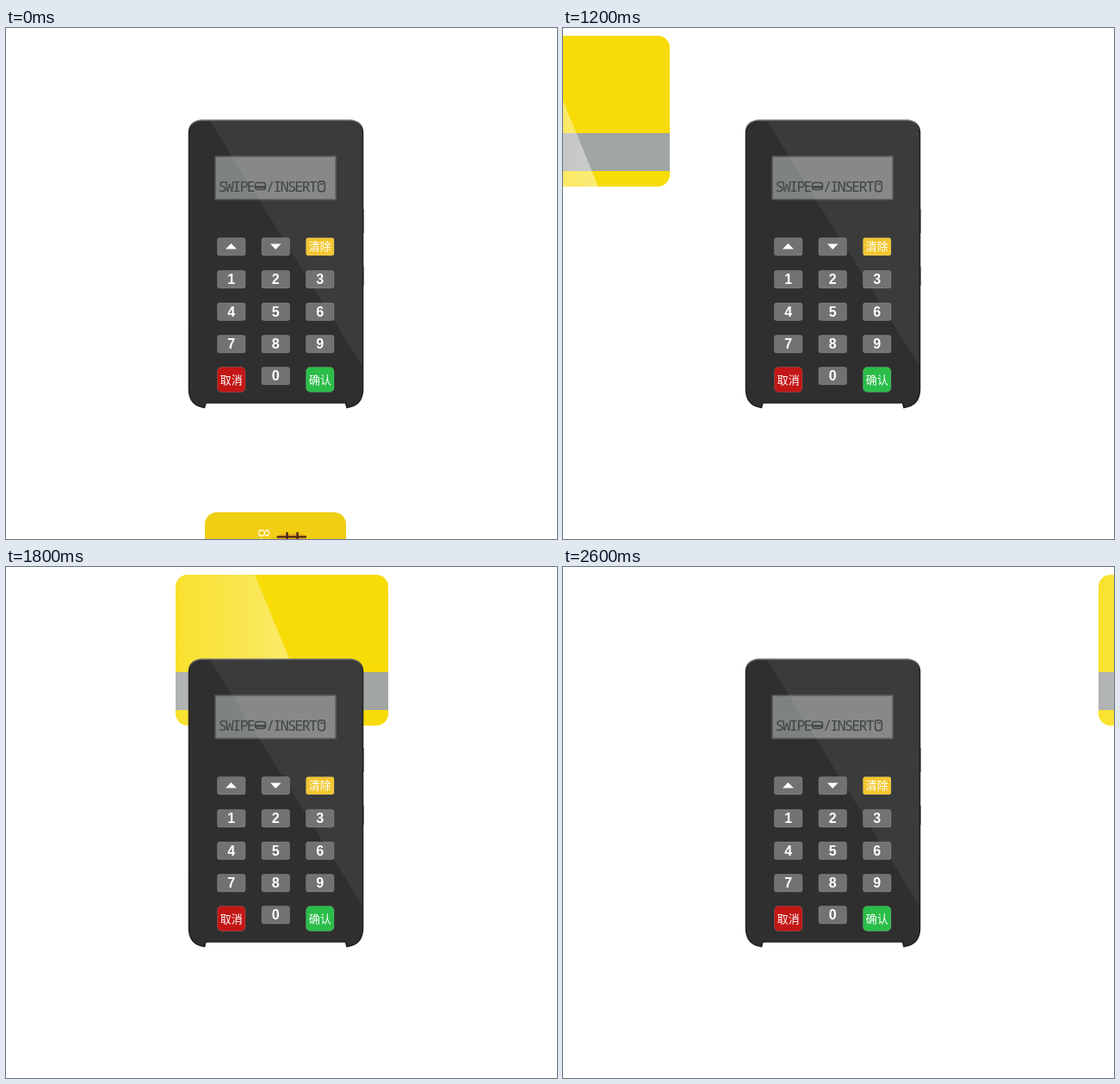
Animation, 640 px wide and 593 px high, one loop 2800 ms. Source, as an HTML page:

```html
<!DOCTYPE html>
<html lang="zh">
<head>
<meta charset="utf-8">
<title>Card terminal</title>
<style>
  html, body { margin: 0; width: 100%; height: 100%; overflow: hidden; background: #fff; }
  svg { display: block; }
  .digit { font: bold 16px "Liberation Sans", Arial, sans-serif; }
  .label { font: 500 13px "Noto Sans CJK SC", "Noto Sans CJK", sans-serif; }
  .digit, .label { fill: #fff; text-anchor: middle; }
  .lcd { font: 500 17px "Noto Sans Mono", monospace; letter-spacing: -1.9px; fill: #414543; }
  .number { font: 18px "Liberation Sans", Arial, sans-serif; letter-spacing: .4px; word-spacing: 7px; fill: #fffbe8; }
</style>
</head>
<body>
<svg width="640" height="593" viewBox="0 0 640 593">
  <defs>
    <linearGradient id="frontShine" x1="1" y1="0" x2=".3" y2="1">
      <stop offset="0" stop-color="#fbec9e"/>
      <stop offset="1" stop-color="#fbe056"/>
    </linearGradient>
    <linearGradient id="backShine">
      <stop offset="0" stop-color="#fff" stop-opacity=".15"/>
      <stop offset="1" stop-color="#fff" stop-opacity=".45"/>
    </linearGradient>
    <linearGradient id="edge" x2="0" y2="1">
      <stop offset="0" stop-color="#777"/>
      <stop offset=".03" stop-color="#262626"/>
      <stop offset="1" stop-color="#202020"/>
    </linearGradient>
    <clipPath id="frontShape"><rect width="164" height="231" rx="14"/></clipPath>
    <clipPath id="backShape"><rect width="247" height="175" rx="14"/></clipPath>
  </defs>

  <g id="front"><g clip-path="url(#frontShape)">
    <rect width="164" height="231" fill="#f0ce14"/>
    <path d="M164 66L0 171V231H164Z" fill="url(#frontShine)"/>
    <rect x="84" y="25" width="34" height="30" rx="6" fill="#eaa925"/>
    <path d="M83.500 28.500H118M83.500 51.500H118M95.500 23V56.500M107.500 23V56.500M83.500 36.500H95M83.500 44.500H95M108 36.500H118M108 44.500H118"
          stroke="#40210f" stroke-width="2.200"/>
    <text class="number" transform="translate(61.500 19) rotate(90)">8888 8888 8888 8888</text>
  </g></g>

  <g id="back"><g clip-path="url(#backShape)">
    <rect width="247" height="175" fill="#f8dc08"/>
    <rect y="113" width="247" height="44" fill="#a1a5a3"/>
    <path d="M0 0H92L164 175H0Z" fill="url(#backShine)"/>
  </g></g>

  <g id="terminal">
    <path d="M414 210h1.500v28h-1.500zM414 277h1.500v22h-1.500z" fill="#222"/>
    <path d="M226 107H401Q414 109 414.500 121V420Q414 438 396 440.500L394.500 435H232L230.500 440.500Q213 438 212.500 420V121Q213 109 226 107Z"
          fill="#2f2f2f" stroke="url(#edge)" stroke-width="1.600"/>
    <rect x="243" y="149" width="140" height="50" fill="#7e8280" stroke="#535655" stroke-width="1.500"/>
    <path d="M237 108H401Q413 110 413.500 121V392Z" fill="#fff" opacity=".06"/>
    <text class="lcd" x="246.500" y="190">SWIPE</text>
    <text class="lcd" x="302" y="190">/INSERT</text>
    <g fill="none" stroke="#414543" stroke-width="1.500">
      <rect x="289.500" y="179.500" width="12" height="8" rx="3"/>
      <path d="M290 184.500H301" stroke-width="2.500"/>
      <rect x="362.700" y="177.700" width="7.600" height="12" rx="3"/>
      <path d="M365 181H368.500"/>
    </g>
    <g id="keys"></g>
    <path d="M255 256.500L261.500 250L268 256.500ZM307 250.500H319.500L313.200 257Z" fill="#fff"/>
  </g>
</svg>
<script>
const STEP = 200;
const frontTops = [562, 522, 482, 416, 350];
const backLefts = [-227, -123, -18, 90, 197, 313, 415, 517, 622];
const columns = [245, 296.5, 348];
const rows = [243, 281, 318.5, 356, 393];
const front = document.getElementById("front");
const back = document.getElementById("back");

function key(label, column, row, color = "#727272", height = 21.5) {
  const x = columns[column], y = rows[row];
  const isDigit = /\d/.test(label);
  const baseline = y + height / 2 + (isDigit ? 5.5 : 4.7);
  return `<rect x="${x + .5}" y="${y + .5}" width="32.5" height="${height - 1}"
      rx="${height > 25 ? 5 : 2.5}" fill="${color}" stroke="#fff" stroke-opacity=".14"/>
    <text class="${isDigit ? "digit" : "label"}" x="${x + 16.7}" y="${baseline}">${label}</text>`;
}

const keys = [
  key("", 0, 0), key("", 1, 0), key("清除", 2, 0, "#f3c62f"),
  key("0", 1, 4), key("取消", 0, 4, "#c21716", 30), key("确认", 2, 4, "#2bbd49", 30)
];
for (let n = 1; n <= 9; n++) keys.push(key(String(n), (n - 1) % 3, Math.ceil(n / 3)));
document.getElementById("keys").innerHTML = keys.join("");

function place(card, x, y, visible) {
  card.setAttribute("visibility", visible ? "visible" : "hidden");
  if (visible) card.setAttribute("transform", `translate(${x} ${y})`);
}

function draw(now) {
  const step = Math.floor(now / STEP) % (frontTops.length + backLefts.length);
  const inserting = step < frontTops.length;
  place(front, 231, frontTops[step], inserting);
  place(back, backLefts[step - frontTops.length], 9, !inserting);
  requestAnimationFrame(() => draw(performance.now() - start));
}

const start = performance.now();
draw(0);
</script>
</body>
</html>
```
